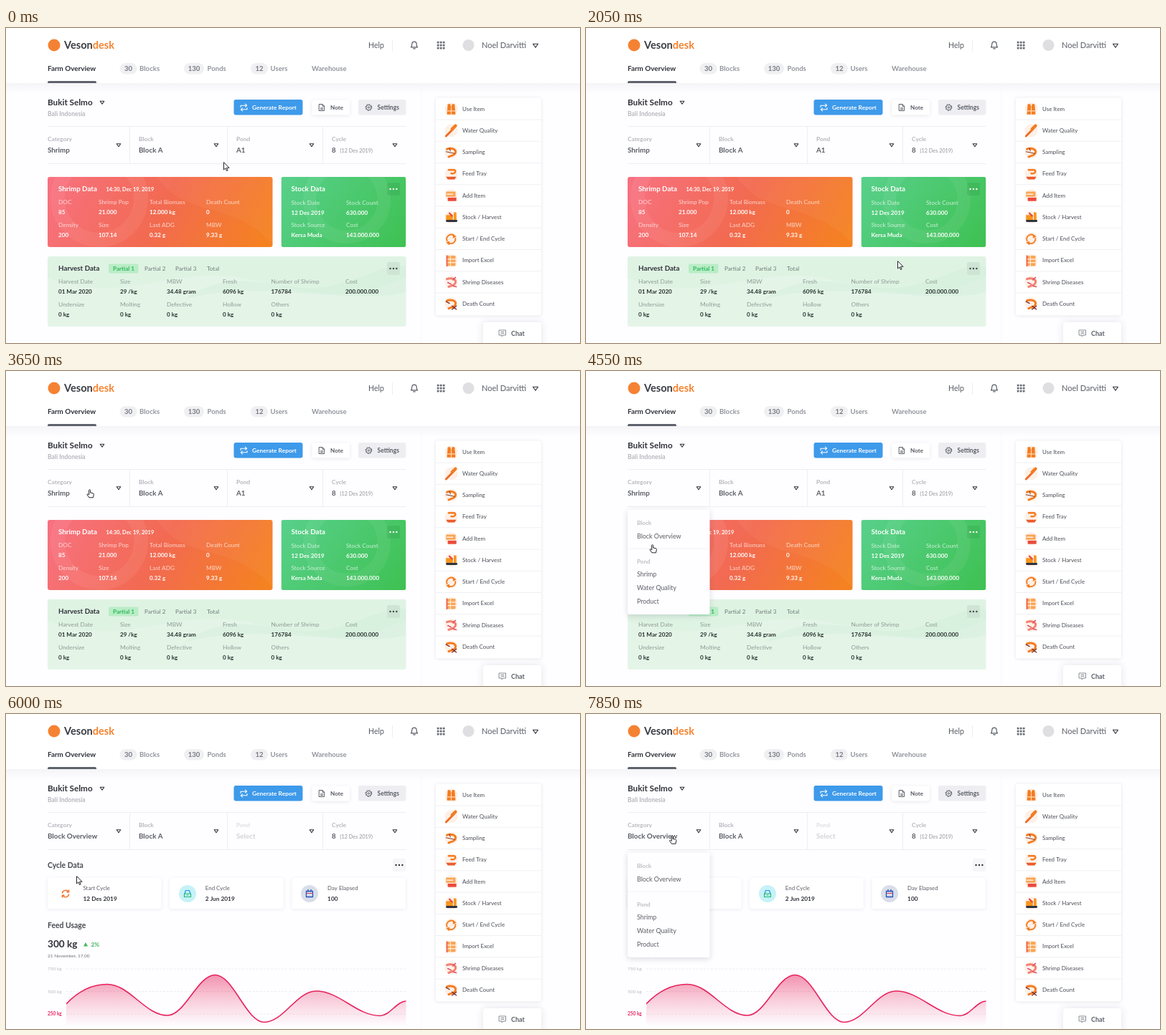
An HTML page with a canvas that plays this animation: 800 by 440 pixels, repeating every 8000 ms.

```html
<!DOCTYPE html>
<html lang="en">
<head>
<meta charset="utf-8">
<title>Farm dashboard</title>
<style>
html, body { margin: 0; width: 100%; height: 100%; overflow: hidden; background: #fefdff; }
canvas { display: block; width: 800px; height: 440px; }
</style>
</head>
<body>
<canvas id="stage"></canvas>
<script>
const canvas = document.getElementById('stage');
const ctx = canvas.getContext('2d');
const dpr = window.devicePixelRatio || 1;
canvas.width = 800 * dpr;
canvas.height = 440 * dpr;

const LOOP = 8000;
const PAGE = '#fefdff', DARK = '#2f3139', MID = '#5a5d66', GREY = '#92959c', PALE = '#b5b7be';
const LINE = '#eeeef2', ORANGE = '#f47c20', RED = '#ea4b3c', PINK = '#e6225c';

const clamp = v => Math.max(0, Math.min(1, v));
const ease = v => { v = clamp(v); return v * v * (3 - 2 * v); };
const ramp = (t, from, to) => ease((t - from) / (to - from));

function text(str, x, y, size, color, bold) {
  ctx.font = `${bold ? 700 : 400} ${size}px Lato, sans-serif`;
  ctx.fillStyle = color;
  ctx.fillText(str, x, y);
}

function box(x, y, w, h, r, fill) {
  ctx.beginPath();
  ctx.roundRect(x, y, w, h, r);
  ctx.fillStyle = fill;
  ctx.fill();
}

function raised(x, y, w, h, r, fill, blur, alpha, dy = 1) {
  ctx.save();
  ctx.shadowColor = `rgba(40,45,80,${alpha})`;
  ctx.shadowBlur = blur * dpr;
  ctx.shadowOffsetY = dy * dpr;
  box(x, y, w, h, r, fill);
  ctx.restore();
}

function circle(x, y, r, fill) {
  ctx.beginPath();
  ctx.arc(x, y, r, 0, 7);
  ctx.fillStyle = fill;
  ctx.fill();
}

function line(x1, y1, x2, y2, color = LINE, width = 1) {
  ctx.beginPath();
  ctx.moveTo(x1, y1);
  ctx.lineTo(x2, y2);
  ctx.strokeStyle = color;
  ctx.lineWidth = width;
  ctx.stroke();
}

// Path placed around (x, y); a stroke width of 0 means filled.
function glyph(x, y, d, color, width = 0, scale = 1) {
  ctx.save();
  ctx.translate(x, y);
  ctx.scale(scale, scale);
  ctx.lineJoin = ctx.lineCap = 'round';
  const p = new Path2D(d);
  if (width) {
    ctx.lineWidth = width;
    ctx.strokeStyle = color;
    ctx.stroke(p);
  } else {
    ctx.fillStyle = color;
    ctx.fill(p);
  }
  ctx.restore();
}

const caret = (x, y, s = 1, color = DARK) =>
  glyph(x, y, `M${-2.8 * s} ${-1.8 * s}H${2.8 * s}L0 ${2.2 * s}Z`, color, 1.1);

function dots(x, y, back, color) {
  box(x - 9, y - 9, 18, 18, 3, back);
  for (let i = -1; i < 2; i++) circle(x + i * 4.4, y, 1.2, color);
}

function blend(x1, y1, x2, y2, ...colors) {
  const g = ctx.createLinearGradient(x1, y1, x2, y2);
  colors.forEach((c, i) => g.addColorStop(i / (colors.length - 1), c));
  return g;
}

const CYCLE = 'M-4.6 -1A4.8 4.8 0 0 1 4 -2.6M4.6 -5V-2.3H2M4.6 1A4.8 4.8 0 0 1 -4 2.6M-4.6 5V2.3H-2';
const SHRIMP = 'M-5 -4C0 -6 6 -4 5 0C4 4 0 3 -3 5';

function header() {
  ctx.fillStyle = blend(0, 77, 0, 92, 'rgba(40,45,80,.045)', 'rgba(40,45,80,0)');
  ctx.fillRect(0, 77, 800, 15);
  ctx.fillStyle = '#fff';
  ctx.fillRect(0, 0, 800, 77);

  circle(67, 24, 8.5, '#f58233');
  text('Veson', 81, 28.5, 14.6, '#3b3d45', true);
  const split = 81 + ctx.measureText('Veson').width;
  text('desk', split, 28.5, 14.6, '#f5822f', true);

  text('Help', 505, 28, 10.6, MID);
  line(538.5, 16, 538.5, 33);
  glyph(569, 24, 'M-4.5 2.8C-3 1.5 -3.4 -.5 -3.2 -2C-2.6 -5.8 2.6 -5.8 3.2 -2C3.4 -.5 3 1.5 4.5 2.8ZM-1.3 4.8H1.3', MID, 1.2);
  for (let i = 0; i < 9; i++)
    box(600.8 + (i % 3) * 4, 18.8 + Math.floor(i / 3) * 4, 2.7, 2.7, .5, '#6a6d76');
  circle(644.5, 24, 8, '#dfdfe1');
  text('Noel Darvitti', 663, 28, 11, MID);
  caret(738, 24.5, 1.25);

  text('Farm Overview', 58, 60, 9.9, DARK, true);
  box(58, 74, 68, 3, [2, 2, 0, 0], '#5d626c');
  for (const [n, x, w, name, tx] of [['30', 158.5, 24, 'Blocks', 186], ['130', 248, 28, 'Ponds', 280.5], ['12', 341, 24, 'Users', 368.5]]) {
    box(x, 49, w, 15.5, 8, '#f0f0f3');
    ctx.textAlign = 'center';
    text(n, x + w / 2, 60, 9.6, '#777a83', true);
    ctx.textAlign = 'left';
    text(name, tx, 60, 9.6, GREY, true);
  }
  text('Warehouse', 426, 60, 9.6, GREY, true);
}

function toolbar() {
  text('Bukit Selmo', 58, 108, 11.7, DARK, true);
  caret(134, 104);
  text('Bali Indonesia', 58, 122.5, 8.5, PALE, true);

  box(317.5, 100, 96, 21.5, 3, '#3e9aea');
  glyph(331.5, 111, 'M-4.5 -.6V-2.8H4M2 -4.8L4.2 -2.8L2 -.8M4.5 .6V2.8H-4M-2 .8L-4.2 2.8L-2 4.8', '#fff', 1.1);
  text('Generate Report', 343, 114, 8.4, '#fff', true);
  raised(426.5, 100.5, 52.5, 21, 3, '#fff', 5, .1);
  glyph(440, 111, 'M-3.4 -4.5H1L3.6 -1.8V4.5H-3.4ZM1 -4.5V-1.8H3.6M-1.5 .8H1.6M-1.5 2.6H1.6', MID, 1);
  text('Note', 452, 114, 8.2, MID, true);
  box(491, 100, 66.5, 21.5, 3, '#eeeef2');
  ctx.save();
  ctx.setLineDash([1.2, 2.26]);
  glyph(505.5, 111, 'M4.4 0A4.4 4.4 0 1 1 -4.4 0A4.4 4.4 0 1 1 4.4 0', MID, 1);
  ctx.restore();
  glyph(505.5, 111, 'M3.6 0A3.6 3.6 0 1 1 -3.6 0A3.6 3.6 0 1 1 3.6 0M1.2 0A1.2 1.2 0 1 1 -1.2 0A1.2 1.2 0 1 1 1.2 0', MID, .9);
  text('Settings', 517.5, 114, 8.5, MID, true);
}

function selectors(overview) {
  line(58, 137.5, 557.5, 137.5);
  line(58, 189.5, 557.5, 189.5);
  for (const x of [172.5, 308.5, 441.5]) line(x, 138, x, 189);
  const items = [
    ['Category', overview ? 'Block Overview' : 'Shrimp', 58, 157],
    ['Block', 'Block A', 185, 293],
    ['Pond', overview ? 'Select' : 'A1', 321, 426],
    ['Cycle', '8', 454, 542]
  ];
  items.forEach(([label, value, x, cx], i) => {
    const off = overview && i === 2;
    text(label, x, 157.5, 8.4, off ? '#dddee2' : PALE, true);
    text(value, x, 174, 9.8, off ? '#d3d4d9' : MID, true);
    caret(cx, 163.5);
  });
  text('(12 Des 2019)', 465.5, 173.5, 7.3, GREY);
}

const ICONS = [
  [['M-5 6L-4 -6H-1L0 -2L1 -6H4L5 6Z', ORANGE], ['M-5 2H5M0 -2V6', '#ffd9b5', 1]],
  [['M-6 6L2 -2', '#ef6b23', 2.4], ['M1 -2L5 -6', ORANGE, 3.6]],
  [[SHRIMP, ORANGE, 2.4], ['M-6 -1L4 1M-2 -5L-1 -2', '#8a3b24', .9]],
  [['M-3 -5H4C6 -3 4 0 0 -1', ORANGE, 2], ['M-6 3H6L4 6H-4Z', '#ec5b2b']],
  [['M-6 -5H5V1H-6Z', '#f9a556'], ['M-4 2H6V6H-4Z', RED], ['M-5 -2H2', '#fff', 1]],
  [['M-6 -3H2V3H-6ZM3 -6H6V3H3Z', '#f7941d'], ['M-5 4H6', '#30343e', 2.4], ['M-2 -5L1 -2', RED, 2]],
  [['M-4.8 2A5.3 5.3 0 0 1 3.8 -3.8M4.8 -1A5.3 5.3 0 0 1 -3 4.4', ORANGE, 1.5], ['M2 -6L6 -3L2 -1ZM-2 2L-6 4L-2 7Z', ORANGE]],
  [['M-5 -6H5V6H-5Z', '#f9a556'], ['M-5 -2H5M-5 2H5M-1 -6V6', '#fff0e2', .9], ['M-5 -6V6', RED, 1.2]],
  [[SHRIMP, '#f28070', 2.4], ['M-4 0L0 2M2 -3L5 -6M2 4L6 5', '#e0506a', 1.3]],
  [[SHRIMP, ORANGE, 2.4], ['M-6 -3L-2 -1M1 2L6 6M6 2L1 6', '#7d2a25', 1.1]]
];
const ACTIONS = ['Use Item', 'Water Quality', 'Sampling', 'Feed Tray', 'Add Item', 'Stock / Harvest',
  'Start / End Cycle', 'Import Excel', 'Shrimp Diseases', 'Death Count'];

function sidebar() {
  line(578.5, 78, 578.5, 440, '#f8f8fa');
  raised(599, 97.5, 147, 304, 3, '#fff', 4, .13, .5);
  ACTIONS.forEach((name, i) => {
    const y = 113 + i * 30.25;
    if (i) line(599, y - 15.2, 746, y - 15.2, '#f0f0f4');
    circle(620.5, y, 9, '#fdf0e7');
    for (const [d, color, width] of ICONS[i]) glyph(620.5, y + .5, d, color, width, 1.2);
    text(name, 636, y + 2.7, 8, '#4b4e57');
  });
  raised(665, 411, 81, 40, 4, '#fff', 12, .12, 0);
  glyph(692, 426, 'M-4.5 -4H4.5V3H1L-1 5V3H-4.5ZM-2 -1.6H2M-2 .6H2', '#7c7f88', .9);
  text('Chat', 704, 429.5, 9, MID, true);
}

// Label over value, laid out by column and row.
function table(cols, rows, labelY, labelColor, valueColor) {
  rows.forEach((row, r) => row.forEach(([label, value], c) => {
    text(label, cols[c], labelY[r], 8.3, labelColor);
    text(value, cols[c], labelY[r] + 14, 8.1, valueColor, true);
  }));
}

function clipped(x, y, w, h, draw) {
  ctx.save();
  ctx.beginPath();
  ctx.roundRect(x, y, w, h, 3);
  ctx.clip();
  draw();
  ctx.restore();
}

function pondView() {
  clipped(58, 208, 313.5, 98, () => {
    box(58, 208, 314, 98, 0, blend(80, 190, 350, 325, '#f7717f', '#f26a50', '#f58220'));
    glyph(130, 238, 'M58 0A58 58 0 1 1 -58 0A58 58 0 1 1 58 0', 'rgba(255,255,255,.06)', 20);
    glyph(210, 208, 'M0 0C40 60 110 30 165 98V0Z', 'rgba(255,255,255,.04)');
  });
  text('Shrimp Data', 73, 228, 9.8, '#fff', true);
  text('14:30, Dec 19, 2019', 139.5, 227.5, 7.4, '#fff', true);
  table([73, 129, 200, 279], [
    [['DOC', '85'], ['Shrimp Pop', '21.000'], ['Total Biomass', '12.000 kg'], ['Death Count', '0']],
    [['Density', '200'], ['Size', '107.14'], ['Last ADG', '0.32 g'], ['MBW', '9.33 g']]
  ], [246, 278], 'rgba(255,255,255,.72)', '#fff');

  clipped(383.5, 208, 174, 98, () => {
    box(383.5, 208, 174, 98, 0, blend(395, 200, 545, 315, '#58d08a', '#3fc153'));
    glyph(475, 240, 'M52 0A52 52 0 1 1 -52 0A52 52 0 1 1 52 0', 'rgba(255,255,255,.06)', 18);
  });
  text('Stock Data', 397.5, 228, 9.8, '#fff', true);
  dots(540, 225, 'rgba(0,70,20,.09)', '#fff');
  table([397.5, 474], [
    [['Stock Date', '12 Des 2019'], ['Stock Count', '630.000']],
    [['Stock Source', 'Kersa Muda'], ['Cost', '143.000.000']]
  ], [246.7, 278], 'rgba(255,255,255,.72)', '#fff');

  clipped(58, 319, 499.5, 98, () => {
    box(58, 319, 500, 98, 0, '#e4f5e8');
    glyph(58, 319, 'M0 30C110 70 180 10 280 32S420 65 500 28V0H0Z', 'rgba(190,225,200,.14)');
    glyph(58, 319, 'M190 60C270 5 330 60 400 40S470 10 500 14V50C420 70 300 30 190 60Z', 'rgba(185,225,198,.2)');
  });
  text('Harvest Data', 73, 339, 9.8, DARK, true);
  box(143, 329.5, 41.5, 13, 2, '#b9edc6');
  text('Partial 1', 149, 339, 8.1, '#2fb75b', true);
  text('Partial 2', 193, 339, 8.1, '#6f7a76');
  text('Partial 3', 236, 339, 8.1, '#6f7a76');
  text('Total', 280, 339, 8.1, '#6f7a76');
  dots(540, 336, '#cfe4d5', '#3b4a42');
  table([73, 159, 224, 302, 369.5, 473], [
    [['Harvest Date', '01 Mar 2020'], ['Size', '29 /kg'], ['MBW', '34.48 gram'], ['Fresh', '6096 kg'], ['Number of Shrimp', '176784'], ['Cost', '200.000.000']],
    [['Undersize', '0 kg'], ['Molting', '0 kg'], ['Defective', '0 kg'], ['Hollow', '0 kg'], ['Others', '0 kg']]
  ], [357, 389], '#8d9a94', '#27302c');
}

const PEAKS = [[141, 377.5], [225, 421], [291.5, 364.5], [360, 430.5], [432, 387], [521.5, 421.5], [558, 401]];

function traceChart() {
  ctx.beginPath();
  ctx.moveTo(84, 405);
  ctx.bezierCurveTo(100, 388, 120, 377.5, ...PEAKS[0]);
  for (let i = 1; i < PEAKS.length; i++) {
    const [x0, y0] = PEAKS[i - 1], [x1, y1] = PEAKS[i], d = (x1 - x0) * .37;
    ctx.bezierCurveTo(x0 + d, y0, x1 - d, y1, x1, y1);
  }
}

function overviewView() {
  text('Cycle Data', 58, 214.5, 10.4, '#45484f', true);
  dots(548, 211, '#f6f6f9', DARK);
  const cards = [['Start Cycle', '12 Des 2019', 58], ['End Cycle', '2 Jun 2019', 228.3], ['Day Elapsed', '100', 398.6]];
  cards.forEach(([label, value, x]) => {
    raised(x, 229, 158.5, 43, 3, '#fff', 5, .09);
    text(label, x + 49.5, 246, 7.9, MID);
    text(value, x + 49.5, 261, 8.3, DARK, true);
  });
  glyph(83, 251, CYCLE, '#f0702a', 1.4);
  circle(253, 251, 12, '#c6f2f7');
  glyph(253, 251, 'M-4 0L-2.5 -4.5H2.5L4 0', '#2490e8', 1.2);
  glyph(253, 251, 'M-4.5 0H4.5V4.5H-4.5ZM-1 2H1', '#27b877', 1.2);
  circle(423, 251, 12, '#d9deea');
  glyph(423, 251, 'M-4.5 -3.5H4.5V4.5H-4.5ZM-2 -5.5V-3M2 -5.5V-3', '#2453b8', 1.3);
  glyph(423, 251, 'M-3.6 -.5H3.6', '#e2384d', 1.1);

  text('Feed Usage', 58, 298.5, 10.4, '#45484f', true);
  text('300 kg', 58, 326, 13.6, DARK, true);
  glyph(111, 322, 'M-3 2.5L0 -3L3 2.5Z', '#44b75c');
  text('2%', 118.5, 325, 8.4, '#44b75c', true);
  text('21 November, 17.00', 58, 339.7, 6.5, '#6d7079');

  ['750 kg', '500 kg', '250 kg'].forEach((label, i) => {
    const y = 356 + i * 31.5;
    text(label, 58, y + 2.3, 6.5, i === 2 ? PINK : '#b9bbc2', i === 2);
    ctx.setLineDash([3, 2]);
    line(84, y, 557, y, '#ececf0');
    ctx.setLineDash([]);
  });
  clipped(84, 340, 473.5, 110, () => {
    traceChart();
    ctx.lineTo(558, 440);
    ctx.lineTo(84, 440);
    ctx.closePath();
    ctx.fillStyle = blend(0, 362, 0, 436, 'rgba(230,34,92,.5)', 'rgba(230,34,92,.22)', 'rgba(230,34,92,0)');
    ctx.fill();
    traceChart();
    ctx.strokeStyle = PINK;
    ctx.lineWidth = 1.6;
    ctx.stroke();
  });
}

function menu() {
  raised(58, 193.5, 114.5, 146.5, 2, PAGE, 9, .17, 2);
  text('Block', 71, 214.5, 8.1, '#bdbfc5', true);
  text('Block Overview', 71, 233.7, 8.9, MID);
  line(58, 248, 172.5, 248, '#f3f3f6');
  text('Pond', 71, 268.7, 8.1, '#bdbfc5', true);
  text('Shrimp', 71, 287, 8.9, MID);
  text('Water Quality', 71, 306, 8.9, MID);
  text('Product', 71, 325, 8.9, MID);
}

// Pointer stops: time, x, y.
const ROUTE = [
  [0, 303.5, 188], [950, 231.5, 101.5], [2050, 434.5, 326], [3400, 135, 192], [3600, 116.5, 165.5],
  [3950, 116.5, 165.5], [4550, 92.5, 242.5], [5050, 98.5, 227], [6550, 98.5, 227], [7150, 120, 170], [LOOP, 120, 170]
];

function pointerAt(t) {
  const i = ROUTE.findIndex((stop, n) => n && t <= stop[0]);
  const [t0, x0, y0] = ROUTE[i - 1], [t1, x1, y1] = ROUTE[i];
  const k = ramp(t, t0, t1);
  return [x0 + (x1 - x0) * k, y0 + (y1 - y0) * k];
}

const ARROW = 'M0 0V10L2.4 7.9L4 11.5L5.6 10.8L4 7.3H7.2Z';
const HAND = 'M-1 1C-1 -.3 1 -.3 1 1V4.5L4.6 5.2C5.7 5.5 6 6 5.8 7.2L5 11.3H-.6L-3.5 7.3C-3.8 6.4 -2.6 5.8 -1 7.2Z';

function pointer(t, menuOpen) {
  const [x, y] = pointerAt(t);
  const shape = menuOpen || (y > 138 && y < 187) ? HAND : ARROW;
  glyph(x, y, shape, '#fff');
  glyph(x, y, shape, '#25262b', 1);
}

function faded(alpha, draw) {
  if (alpha <= 0) return;
  ctx.save();
  ctx.globalAlpha = alpha;
  draw();
  ctx.restore();
}

function render(t) {
  const swap = ramp(t, 5300, 5550);
  const open = ramp(t, 3850, 4100) - ramp(t, 5200, 5400) + ramp(t, 7350, 7650);
  ctx.setTransform(dpr, 0, 0, dpr, 0, 0);
  ctx.fillStyle = PAGE;
  ctx.fillRect(0, 0, 800, 440);
  header();
  toolbar();
  selectors(t >= 5300);
  if (swap < 1) pondView();
  faded(swap, () => {
    ctx.fillStyle = PAGE;
    ctx.fillRect(50, 191, 520, 249);
    overviewView();
  });
  sidebar();
  faded(open, menu);
  pointer(t, open > 0);
}

const start = performance.now();
function tick() {
  render((performance.now() - start) % LOOP);
  requestAnimationFrame(tick);
}
tick();
</script>
</body>
</html>
```
